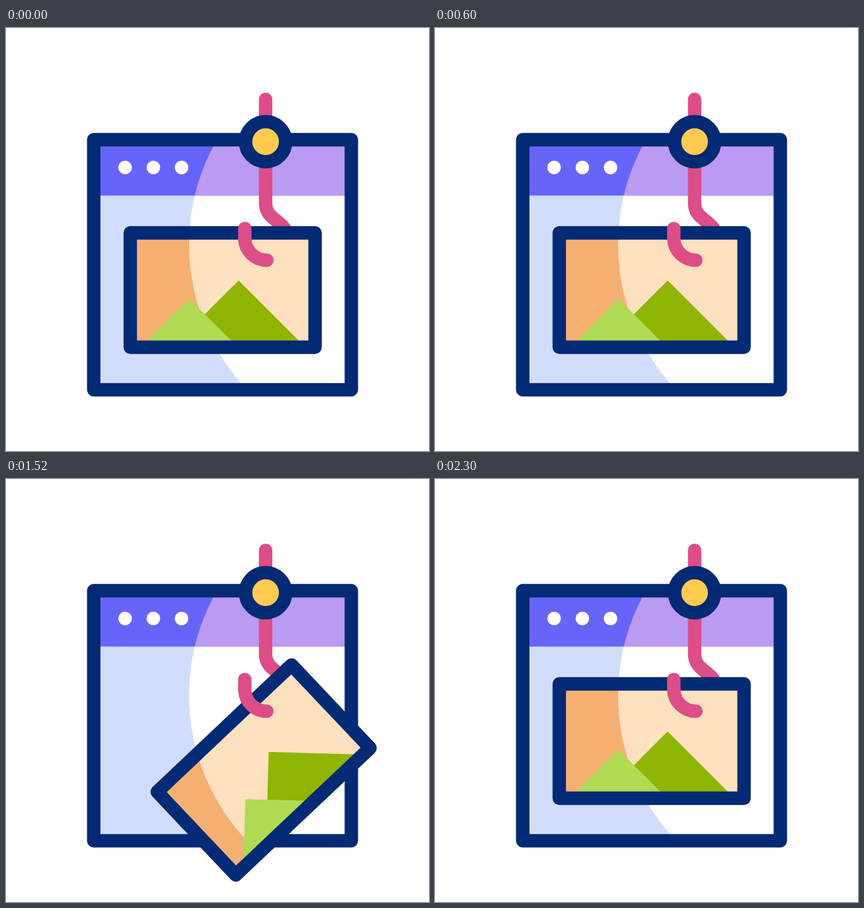
Animation, 640 px wide and 640 px high, one loop 2400 ms. Source, as an HTML page:

```html
<!DOCTYPE html>
<html lang="en">
<head>
<meta charset="utf-8">
<title>Hooked picture</title>
<style>
  @property --tilt { syntax: "<angle>"; inherits: true; initial-value: 0deg; }

  html, body { margin: 0; width: 100%; height: 100%; overflow: hidden; background: #fff; }
  svg { display: block; width: 100%; height: 100%; }

  .scene {
    --ease: cubic-bezier(.36, 0, .64, 1);
    animation: hop 2.4s var(--ease) infinite, swing 2.4s var(--ease) infinite;
  }
  .card, .card .glow { transform-origin: 413.7px 340.4px; }
  .card { transform: rotate(var(--tilt)); }
  /* the glow stays still while its card turns */
  .card .glow { transform: rotate(calc(var(--tilt) * -1)); }

  .edge { fill: none; stroke: #032a74; stroke-width: 20.3; stroke-linejoin: round; }
  .hook { fill: none; stroke: #dd4d87; stroke-width: 20.3; stroke-linecap: round; }
  .tick {
    fill: none; stroke: #fecb50; stroke-width: 20.3; stroke-linecap: round;
    animation: tick 2.4s linear infinite;
  }

  @keyframes hop {
    0%, 8.33% { transform: translateY(0); }
    16.67% { transform: translateY(-44.7px); }
    25%, 100% { transform: translateY(0); }
  }
  @keyframes swing {
    0%, 25% { --tilt: 0deg; }
    37.8% { --tilt: -32deg; }
    50% { --tilt: -6deg; }
    62% { --tilt: -45deg; }
    75.8%, 83.5% { --tilt: 20deg; }
    95.8%, 100% { --tilt: 0deg; }
  }
  @keyframes tick {
    0%, 76.4% { opacity: 0; stroke-dasharray: 0 200; stroke-dashoffset: 0; }
    76.41% { opacity: 1; stroke-dasharray: 0 200; stroke-dashoffset: 0; }
    83.4% { opacity: 1; stroke-dasharray: 48 200; stroke-dashoffset: 0; }
    89.5% { opacity: 1; stroke-dasharray: 50 200; stroke-dashoffset: -50; }
    95% { opacity: 1; stroke-dasharray: 0 200; stroke-dashoffset: -100; }
    95.01%, 100% { opacity: 0; stroke-dasharray: 0 200; stroke-dashoffset: -100; }
  }
</style>
</head>
<body>
<svg viewBox="0 0 640 640">
  <defs>
    <clipPath id="body"><rect x="132.7" y="253.5" width="390" height="294"/></clipPath>
    <clipPath id="bar"><rect x="132.7" y="169" width="390" height="84.5"/></clipPath>
    <clipPath id="photo"><rect x="188" y="310" width="279.6" height="173"/></clipPath>
    <circle id="disc" cx="597" cy="327.5" r="320"/>
  </defs>

  <g class="scene">
    <!-- window -->
    <rect x="132.7" y="169" width="390" height="378.3" fill="#d2ddfd"/>
    <rect x="132.7" y="169" width="390" height="84.5" fill="#6765f9"/>
    <g clip-path="url(#body)"><use href="#disc" fill="#fff"/></g>
    <g clip-path="url(#bar)"><use href="#disc" fill="#bb9af2"/></g>
    <g fill="#fff">
      <circle cx="180.2" cy="211" r="10.3"/>
      <circle cx="223" cy="211" r="10.3"/>
      <circle cx="265.6" cy="211" r="10.3"/>
    </g>
    <rect class="edge" x="132.7" y="169" width="389.8" height="378.3"/>

    <!-- rear part of the hook -->
    <path class="hook" d="M392.8 108V265C392.8 293 426 290 426 320"/>
    <circle class="edge" cx="392.8" cy="172" r="30.3" style="fill:#fecb50"/>

    <g class="card">
      <g clip-path="url(#photo)">
        <rect x="188" y="310" width="279.6" height="173" fill="#f6af73"/>
        <use class="glow" href="#disc" fill="#fde0be"/>
        <path fill="#8fb505" d="M352 382L453 483H251Z"/>
        <path fill="#b0da52" d="M277.3 409.5L351 483H204Z"/>
      </g>
      <rect class="edge" x="188" y="310" width="279.6" height="173"/>
    </g>

    <!-- front part of the hook -->
    <path class="hook" d="M361.3 303.3V318A33.3 33.3 0 0 0 394.8 351.3"/>
  </g>

  <path class="tick" pathLength="100" d="M98.6 373.2L49.2 365"/>
  <path class="tick" pathLength="100" d="M98.6 416.4L49.2 424.6"/>
</svg>
</body>
</html>
```
